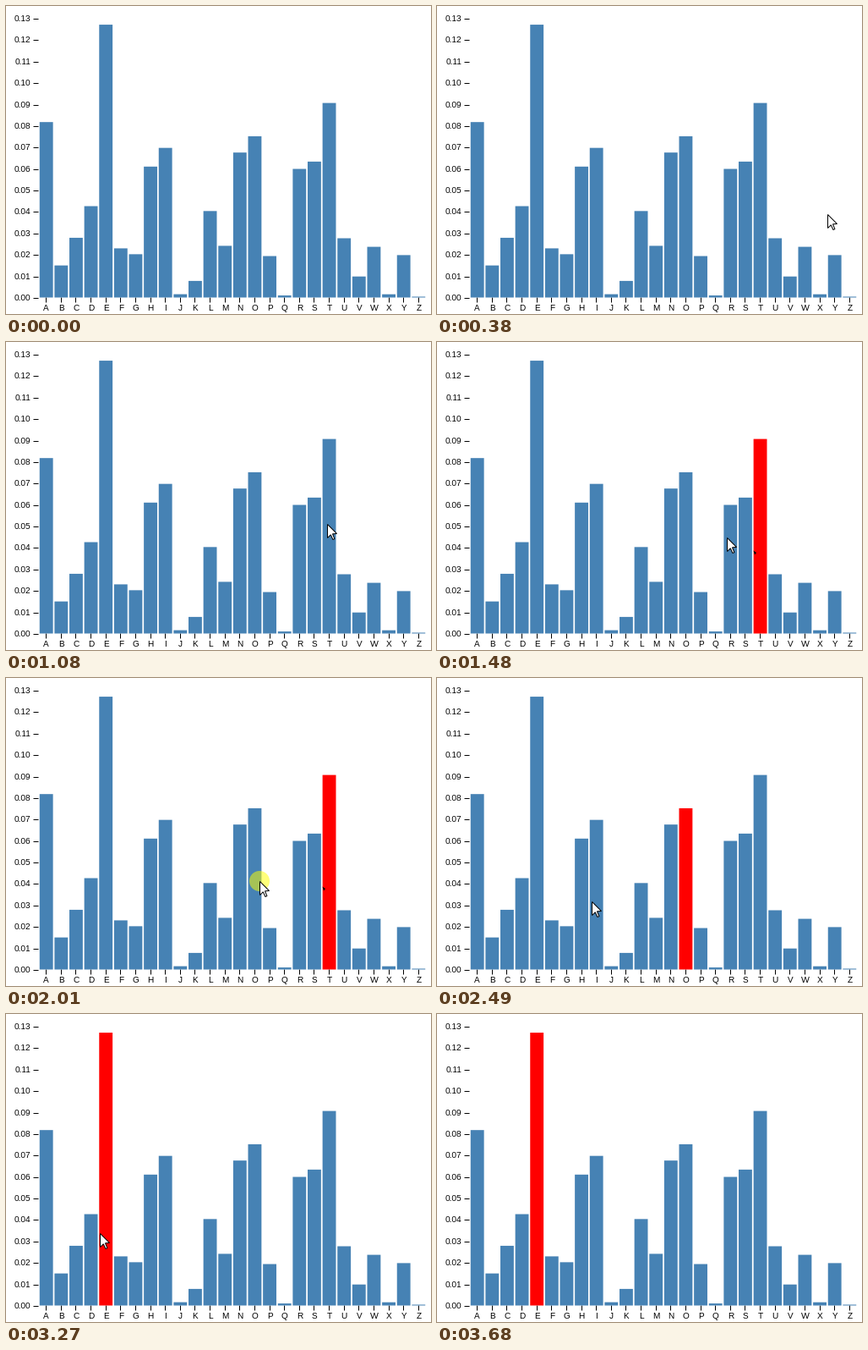
A matplotlib script for the animation above (4610 ms loop, 503 by 364 pixels).

```python
import math

import matplotlib.pyplot as plt
import numpy as np
from matplotlib.animation import FuncAnimation
from matplotlib.collections import LineCollection, PolyCollection
from matplotlib.patches import Circle, Polygon

WIDTH, HEIGHT, DPI = 503, 364, 64
LOOP_MS, STEP_MS = 4610, 10
PX = 72 / DPI  # points per pixel

LEFT, RIGHT, BASE, TOP = 38, 498, 344.5, 14.5
MAX_TICK = 13
UNIT = (BASE - TOP) / MAX_TICK  # pixels per 0.01
BLUE, RED = "#4682b4", "#ff0000"

LETTERS = "ABCDEFGHIJKLMNOPQRSTUVWXYZ"
PERCENT = [8.167, 1.492, 2.78, 4.253, 12.702, 2.288, 2.015, 6.094, 6.966,
           0.153, 0.772, 4.025, 2.406, 6.749, 7.507, 1.929, 0.095, 5.987,
           6.327, 9.056, 2.758, 0.978, 2.36, 0.15, 1.974, 0.04]
PITCH = (RIGHT - LEFT) / (len(LETTERS) + 0.1)
BAR_WIDTH = 0.9 * PITCH

# (start ms, x, y) of the pointer tip; it jumps from one place to the next
POINTER = [
    (230, 489, 300), (300, 478, 270), (380, 462, 246), (470, 437, 233),
    (550, 410, 224), (630, 391, 218), (710, 380, 216), (790, 380, 215),
    (1390, 374, 222), (1470, 343, 231), (1550, 313, 238), (1630, 300, 240),
    (2330, 272, 246), (2410, 217, 258), (2490, 183, 264),
    (2640, 176, 264), (2720, 163, 262), (2790, 148, 261), (2870, 133, 260),
    (2940, 121, 259), (3030, 114, 259), (3110, 111, 259),
    (3440, 170, 274), (3520, 318, 305), (3600, 479, 340),
]
POINTER_END = 3680
CLICKS = [(1020, 1080), (2010, 2100), (3190, 3270)]
SELECTIONS = [(1160, "T"), (2100, "O"), (3270, "E")]
SMUDGE = (1390, 2100)
ARROW = np.array([(0.5, 0.5), (0.5, 16.5), (4.3, 12.8), (6.9, 18.5),
                  (8.9, 17.6), (6.5, 11.8), (11.5, 11.5)])

plt.rcParams["font.family"] = "Liberation Sans"
plt.rcParams["font.size"] = 10 * PX
plt.rcParams["text.hinting"] = "native"

fig = plt.figure(figsize=(WIDTH / DPI, HEIGHT / DPI), dpi=DPI, facecolor="white")
ax = fig.add_axes([0, 0, 1, 1])
ax.set(xlim=(0, WIDTH), ylim=(HEIGHT, 0))
ax.axis("off")


def pixel_center(value):
    return math.floor(value) + 0.5


def bar_corners(index):
    x = LEFT + 0.1 * PITCH + index * PITCH
    y = BASE - PERCENT[index] * UNIT
    return [(x, y), (x + BAR_WIDTH, y), (x + BAR_WIDTH, BASE), (x, BASE)]


ticks = []
for k in range(MAX_TICK + 1):
    y = pixel_center(BASE - k * UNIT)
    ticks.append([(LEFT - 6, y), (LEFT, y)])
    ax.text(LEFT - 9, round(y + 3.2), f"{k / 100:.2f}", ha="right", va="baseline")
for i, letter in enumerate(LETTERS):
    center = LEFT + 0.1 * PITCH + i * PITCH + BAR_WIDTH / 2
    x = pixel_center(center)
    ticks.append([(x, 344), (x, 350)])
    ax.text(center, 360, letter, ha="center", va="baseline")
ax.add_collection(LineCollection(ticks, colors="black", linewidths=PX,
                                 capstyle="butt", zorder=1), autolim=False)

bars = PolyCollection([bar_corners(i) for i in range(len(LETTERS))],
                      facecolors=BLUE, linewidths=0, zorder=2)
bars.set_snap(False)
ax.add_collection(bars, autolim=False)

smudge = ax.add_patch(Polygon([(374.5, 246.5), (378, 249), (376, 251.5)],
                              fc="black", lw=0, zorder=3))
halo = ax.add_patch(Circle((0, 0), 12, fc="#ffff00", alpha=0.52, lw=0, zorder=4))
arrow = ax.add_patch(Polygon(ARROW, fc="white", ec="black", lw=PX,
                             joinstyle="miter", zorder=5))


def latest(events, now):
    """Last event that has started, or None."""
    return next((e for e in reversed(events) if e[0] <= now), None)


def update(frame):
    now = frame * STEP_MS

    selected = latest(SELECTIONS, now)
    bars.set_facecolor([RED if selected and letter == selected[1] else BLUE
                        for letter in LETTERS])

    place = latest(POINTER, now)
    arrow.set_visible(place is not None and now < POINTER_END)
    if place:
        arrow.set_xy(ARROW + place[1:])
        halo.center = place[1:]
    halo.set_visible(any(start <= now < end for start, end in CLICKS))
    smudge.set_visible(SMUDGE[0] <= now < SMUDGE[1])
    return bars, smudge, halo, arrow


animation = FuncAnimation(fig, update, frames=LOOP_MS // STEP_MS,
                          interval=STEP_MS, repeat=True, repeat_delay=0)
plt.show()
```
